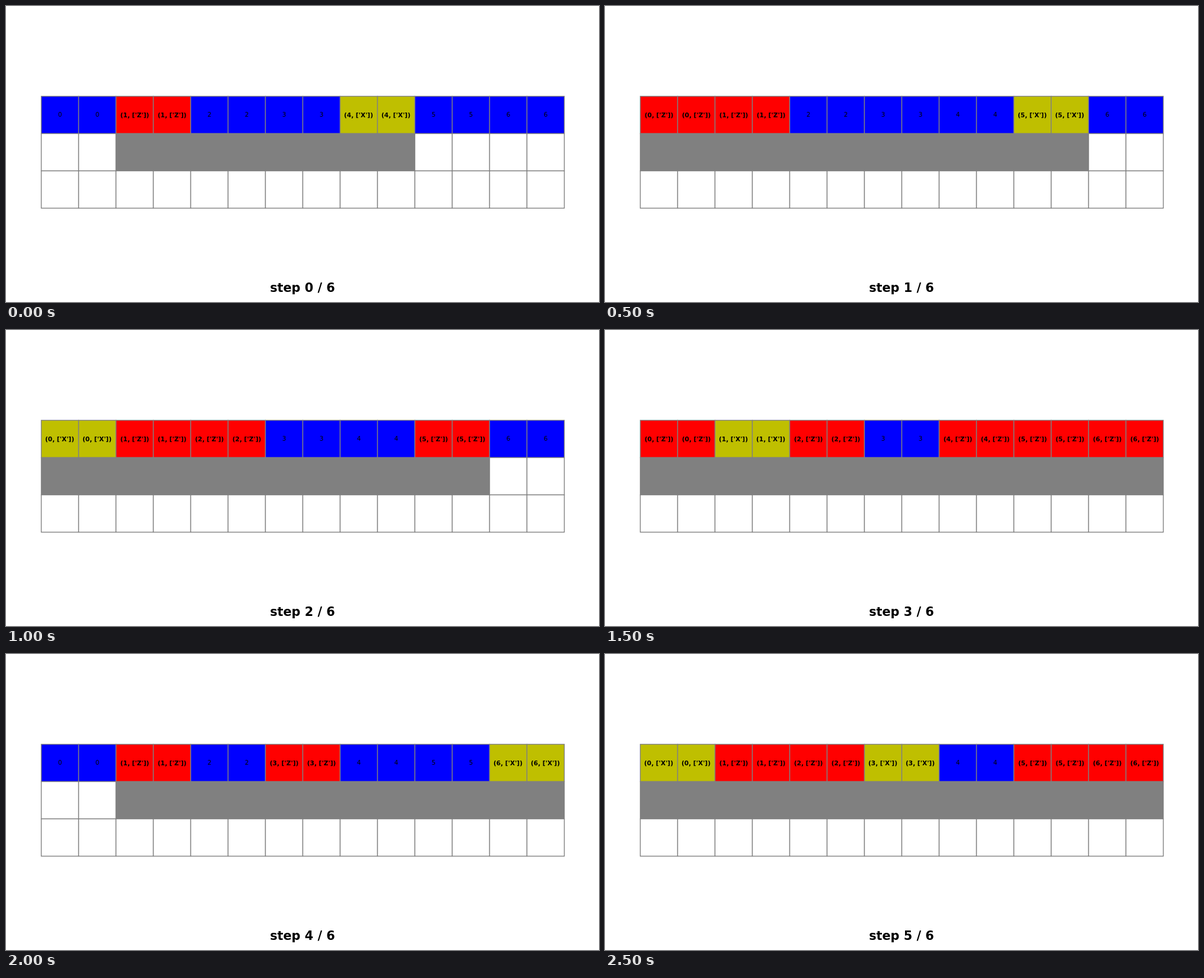
An HTML page with a canvas that plays this animation: 1000 px wide and 500 px high, repeating every 3000 ms.

```html
<!DOCTYPE html>
<html lang="en">
<head>
<meta charset="utf-8">
<title>Step grid</title>
<style>
  html, body { margin: 0; width: 100%; height: 100%; overflow: hidden; background: #fff; }
  canvas { display: block; }
</style>
</head>
<body>
<canvas id="stage" width="1000" height="500"></canvas>
<script>
const ctx = document.getElementById('stage').getContext('2d');
const STEP_MS = 500, CELL = 63, LEFT = 59.5, TOP = 152.5, COLS = 14;
const GREY = '#808080';
const COLORS = { '.': '#0000ff', Z: '#ff0000', X: '#bfbf00' };

// One letter per pair of cells: "." is idle, Z and X are active.
const STEPS = ['.Z..X..', 'ZZ...X.', 'XZZ..Z.', 'ZXZ.ZZZ', '.Z.Z..X', 'XZZX.ZZ'];

function cell(col, row, fill) {
  const x = LEFT + col * CELL, y = TOP + row * CELL;
  ctx.fillStyle = fill;
  ctx.fillRect(x, y, CELL, CELL);
  ctx.strokeRect(x, y, CELL, CELL);
}

function label(text, x, y, size, weight) {
  ctx.font = `${weight} ${size}px "DejaVu Sans", sans-serif`;
  ctx.fillStyle = '#000';
  ctx.fillText(text, x, y);
}

function draw(step) {
  const ops = STEPS[step];
  const active = [...ops].map((op, i) => op === '.' ? -1 : i).filter(i => i >= 0);
  const first = active[0], last = active[active.length - 1];

  ctx.fillStyle = '#fff';
  ctx.fillRect(0, 0, 1000, 500);
  ctx.strokeStyle = GREY;
  ctx.lineWidth = 1.39;
  ctx.textAlign = 'center';

  for (let row = 0; row < 3; row++) {
    for (let col = 0; col < COLS; col++) {
      const id = col >> 1;
      const busy = row === 1 && id >= first && id <= last;
      cell(col, row, row === 0 ? COLORS[ops[id]] : busy ? GREY : '#fff');
    }
  }
  for (let col = 0; col < COLS; col++) {
    const id = col >> 1, op = ops[id], x = LEFT + (col + 0.5) * CELL;
    if (op === '.') label(id, x, 187, 10.42, 'normal');
    else label(`(${id}, ['${op}'])`, x - (op === 'X' ? 0.5 : 0), 187.5, 10.6, 'bold');
  }
  label(`step ${step} / ${STEPS.length}`, 500, 483, 20.83, 'bold');
}

let shown = -1;
function tick(now) {
  const step = Math.floor(now / STEP_MS) % STEPS.length;
  if (step !== shown) draw(shown = step);
  requestAnimationFrame(tick);
}
draw(shown = 0);
requestAnimationFrame(tick);
</script>
</body>
</html>
```
